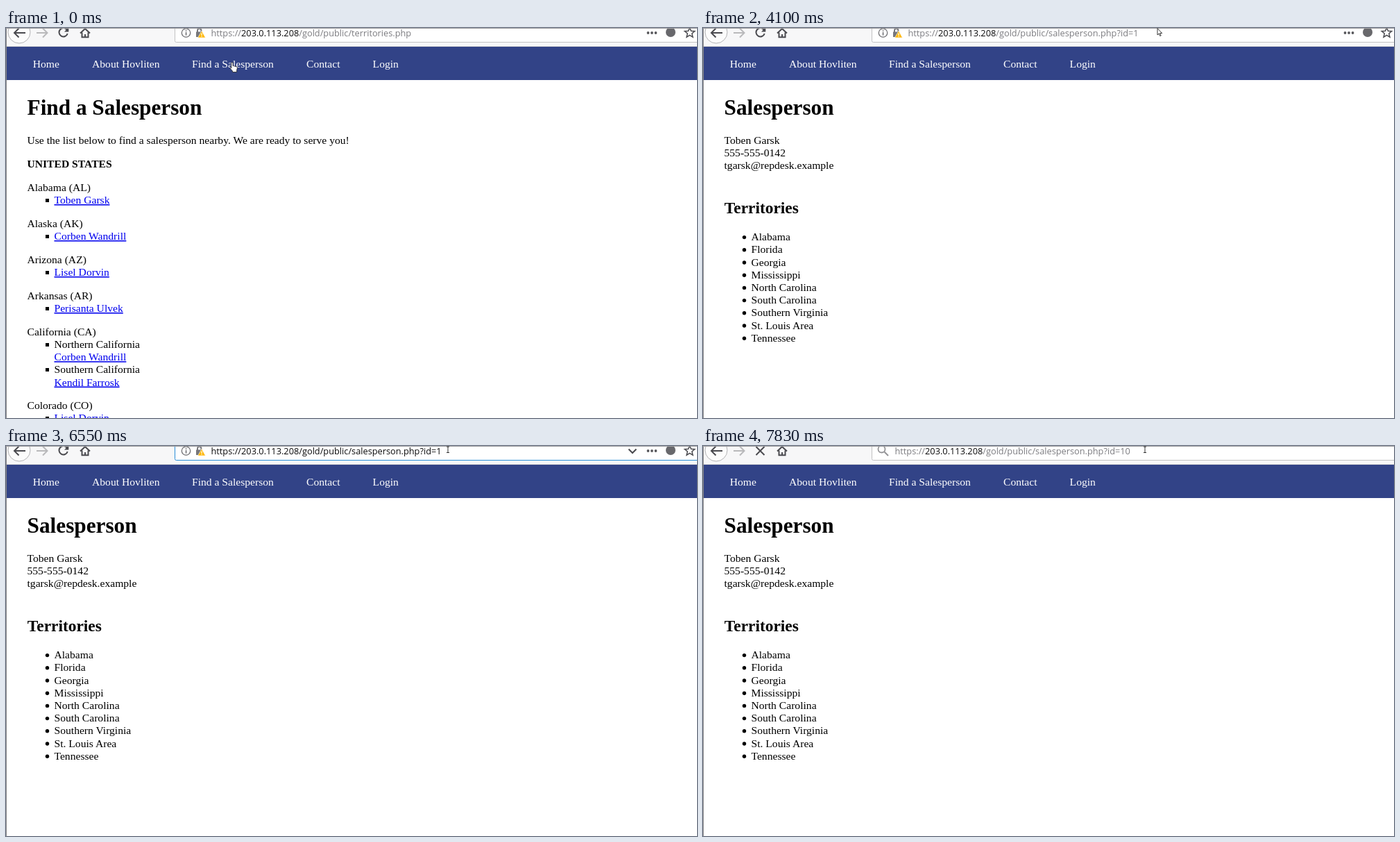
An HTML page that plays this animation: 996x562 px, repeating every 8000 ms.

```html
<!DOCTYPE html>
<html lang="en">
<head>
<meta charset="utf-8">
<title>Find a Salesperson</title>
<style>
  html, body { margin: 0; width: 100%; height: 100%; overflow: hidden; background: #fff; }
  svg { display: block; width: 996px; height: 562px; }
  text { white-space: pre; }
  #page { font: 15.62px "Liberation Serif", "Times New Roman", serif; }
  .h1 { font-size: 31.25px; font-weight: bold; }
  .h2 { font-size: 23.4px; font-weight: bold; }
  .b { font-weight: bold; }
  .link { fill: #00e; text-decoration: underline; }
  #bar, #drop { font: 12.77px "Open Sans", "Noto Sans", sans-serif; }
  .hit { font-size: 12.9px; font-weight: 600; }
  .visit { font-size: 11.6px; }
  .search { font-size: 11.08px; }
  .line { fill: none; stroke: #4a4a4f; stroke-width: 2; }
  .dim { fill: #7c7c80; }
  .host { fill: #0c0c0d; }
  .focus .dim { fill: #0c0c0d; }
  .picked .dim, .picked .host { fill: #fff; }
</style>
</head>
<body>
<svg id="stage" viewBox="0 0 996 562"></svg>
<script>
const LOOP = 8000;
const HOST = '203.0.113.208';
const PATH = '/gold/public/';

const text = (x, y, s, cls = '') => `<text x="${x}" y="${y}" class="${cls}">${s}</text>`;
const rect = (x, y, w, h, fill, more = '') =>
  `<rect x="${x}" y="${y}" width="${w}" height="${h}" fill="${fill}" ${more}/>`;
const circle = (x, y, r, fill, more = '') =>
  `<circle cx="${x}" cy="${y}" r="${r}" fill="${fill}" ${more}/>`;
const line = (d, style = '') => `<path class="line" d="${d}" style="${style}"/>`;
const shape = (d, fill, more = '') => `<path d="${d}" fill="${fill}" ${more}/>`;
const group = (id, ...parts) => `<g id="${id}">${parts.join('')}</g>`;

function nav() {
  const items = [[38.8, 'Home'], [124, 'About Hovliten'], [268, 'Find a Salesperson'],
                 [433, 'Contact'], [528.6, 'Login']];
  return rect(0, 27, 996, 48, '#324387') +
    `<g fill="#fff">${items.map(([x, s]) => text(x, 57, s)).join('')}</g>`;
}

function territories() {
  const reps = ['Toben Garsk', 'Corben Wandrill', 'Lisel Dorvin', 'Perisanta Ulvek', 'Kendil Farrosk'];
  const states = ['Alabama (AL)', 'Alaska (AK)', 'Arizona (AZ)', 'Arkansas (AR)'];
  const link = (y, i) => text(69.5, y, reps[i], 'link');
  const bullet = y => rect(57, Math.round(y - 7.2), 5, 5, '#000');
  let out = text(30.6, 125.4, 'Find a Salesperson', 'h1') +
    text(30.5, 167, 'Use the list below to find a salesperson nearby. We are ready to serve you!') +
    text(30.5, 201, 'UNITED STATES', 'b');
  states.forEach((s, i) => {
    const y = 234.8 + 52 * i;
    out += text(30.5, y, s) + bullet(y + 18.2) + link(y + 18.2, i);
  });
  out += text(30.5, 442.7, 'California (CA)');
  [['Northern', 1], ['Southern', 4]].forEach(([side, rep], i) => {
    const y = 461 + 36.4 * i;
    out += bullet(y) + text(69.5, y, side + ' California') + link(y + 18.2, rep);
  });
  return out + text(30.5, 549, 'Colorado (CO)') + bullet(567.2) + link(567.2, 2);
}

function profile() {
  const contact = ['Toben Garsk', '555-555-0142', 'tgarsk@repdesk.example'];
  const areas = ['Alabama', 'Florida', 'Georgia', 'Mississippi', 'North Carolina',
    'South Carolina', 'Southern Virginia', 'St. Louis Area', 'Tennessee'];
  return text(30.6, 125.4, 'Salesperson', 'h1') +
    contact.map((s, i) => text(30.5, 167 + 18.2 * i, s)).join('') +
    text(30.8, 266.5, 'Territories', 'h2') +
    areas.map((s, i) => circle(59.5, 301.6 + 18.2 * i, 2.7, '#000') +
      text(69.5, 306.2 + 18.2 * i, s)).join('');
}

function toolbar() {
  const star = [...Array(10)].map((_, i) => {
    const a = Math.PI * (i / 5 - .5), r = i % 2 ? 3.4 : 7.6;
    return `${985.5 + r * Math.cos(a)} ${7 + r * Math.sin(a)}`;
  }).join('L');
  return rect(0, 0, 996, 27, '#f7f7f8') + rect(0, 26, 996, 1, '#d2d2d4') +
    circle(19, 6, 16, '#fcfcfc', 'stroke="#b4b4b6"') +
    line('M28 7H12M18.5 .5 12 7l6.5 6.5') +
    line('M44 7H59M53 .5 59.5 7 53 13.5', 'stroke:#b9b9bb') +
    group('reload', line('M88 3A6.2 6.2 0 1 0 88.7 8'), shape('M90.3-1V5.5H84z', '#4a4a4f')) +
    group('stop', line('M76.5 1 88.5 13M88.5 1 76.5 13')) +
    line('M107 7.5 114 1l7 6.5M109.5 6.5V13.3H118.5V6.5M114 13V9') +
    rect(243.5, -10, 800, 30.5, '#fff', 'id="field" rx="2"') +
    group('siteInfo',
      circle(259.5, 7, 6.2, 'none', 'stroke="#68686c" stroke-width="1.2"'),
      rect(258.8, 6, 1.5, 4.6, '#68686c'), rect(258.8, 3.3, 1.5, 1.6, '#68686c'),
      line('M276 6V3.5a2.7 2.7 0 0 1 5.4 0V6', 'stroke:#77777b'),
      rect(274, 5.5, 9, 7.5, '#77777b'),
      shape('M282 4.2 287.5 14H276.5z', '#ffb80a', 'stroke="#fff" stroke-width=".6"'),
      rect(281.4, 7.5, 1.3, 3, '#fff'), rect(281.4, 11.4, 1.3, 1.2, '#fff')) +
    group('lens', line('M261.5 8.5 267 14', 'stroke:#939396'),
      circle(257.5, 4.5, 5, 'none', 'stroke="#939396" stroke-width="1.8"')) +
    group('actions',
      ...[925.5, 931, 936.5].map(x => circle(x, 7, 1.9, '#58585c')),
      circle(958, 6, 7, '#68686c'),
      line(`M${star}z`, 'stroke-width:1.5')) +
    group('chevron', line('M897.5 4.5 903 10l5.5-5.5')) +
    group('go', line('M978 7H992M986 .5 992.5 7 986 13.5')) +
    group('mark', rect(296, 1, 331, 16, '#0078d7')) +
    `<text id="url" y="11.5"><tspan class="dim">https://</tspan>` +
    `<tspan class="host">${HOST}</tspan><tspan id="path" class="dim"></tspan></text>` +
    rect(0, 1, 1, 13.5, '#000', 'id="caret"');
}

function dropdown() {
  const url = `https://${HOST}${PATH}salesperson.php?id=10`;
  const colors = ['#4285f4', '#0c8484', '#222', '#de5833', '#e53238', '#1da1f2', '#222'];
  const icons = colors.map((c, i) => {
    const x = 24 + 47.8 * i;
    return (i ? rect(Math.round(x - 24.5), 95, 1, 23, '#d4d4d6') : '') +
      (i === 1 ? rect(x - 8, 98, 16, 16, c) : circle(x, 106, i === 3 ? 8 : 6, c));
  });
  return rect(0, 26, 996, 96, '#f9f9fa') + rect(0, 26, 996, 1, '#d2d2d4') +
    rect(3, 30.5, 993, 30, '#0078d7') +
    `<g fill="none" stroke="#fff" stroke-width="1.3">
      <circle cx="260.5" cy="46" r="7"/><ellipse cx="260.5" cy="46" rx="3.2" ry="7"/>
      <path d="M254 43.5h13M254 48.5h13"/></g>` +
    `<g fill="#fff">${text(277, 51, url, 'hit')}${text(633.5, 50.5, '— Visit', 'visit')}</g>` +
    rect(0, 64, 996, 1, '#d8d8da') + rect(0, 90, 996, 1, '#d8d8da') +
    text(6, 81.8, `<tspan class="dim">Search for </tspan>${url}<tspan class="dim"> with:</tspan>`, 'search') +
    icons.join('') + rect(3, 122, 993, 1.5, '#a2a2a4');
}

const cursors = group('cursor',
  group('hand', shape('M-1 1.2a1.1 1.1 0 0 1 2.2 0V5l5 1.2q1.4.4 1.2 2l-.8 3.4V14H.5v-1.4L-3 8.6q-.4-1.4 1-1.3l1 1z',
    '#fff', 'stroke="#222" stroke-width=".8"')),
  group('arrow', shape('M0 0V9.5L2.2 7.5 3.7 11 5.2 10.3 3.7 7H6.7z', '#fff', 'stroke="#222" stroke-width=".9"')),
  group('beam', line('M-2 0H2M0 0V8.5M-2 8.5H2', 'stroke:#333;stroke-width:1')));

const $ = id => document.getElementById(id);
$('stage').innerHTML =
  group('page', nav(), group('list', territories()), group('person', profile())) +
  group('bar', toolbar()) + group('drop', dropdown()) +
  rect(0, 0, 1, 562, '#858587') + rect(0, 0, 996, 1, '#a0a0a2') + cursors;

const show = (id, on) => { $(id).style.display = on ? '' : 'none'; };
const ramp = (t, a, b) => Math.min(1, Math.max(0, (t - a) / (b - a)));
const ease = p => p * p * (3 - 2 * p);
const within = (t, a, b) => t >= a && t < b;

// time, x, y of the pointer tip
const moves = [[0, 326, 49.5], [1200, 326, 49.5], [1240, 318, 53.5], [1390, 318, 53.5],
  [1870, 117, 255], [2180, 117, 255], [2330, 129, 247.5], [3180, 129, 247.5],
  [3730, 600, 8], [3850, 648, 3], [4000, 655, .5], [4230, 655, .5], [4300, 637, 1], [LOOP, 637, 1]];

function pointer(t) {
  const i = moves.findIndex(m => m[0] > t);
  const [a, b] = [moves[i - 1], moves[i]];
  const p = ease(ramp(t, a[0], b[0]));
  return [a[1] + (b[1] - a[1]) * p, a[2] + (b[2] - a[2]) * p];
}

function draw(t) {
  const opened = t >= 3320, typed = t >= 7010;
  const focus = within(t, 4500, 7440), picked = within(t, 4560, 5290);
  show('list', !opened);
  show('person', opened);
  show('drop', within(t, 7010, 7440));

  const busy = ramp(t, 280, 560) - ramp(t, 820, 960) + ramp(t, 2730, 2980) -
    ramp(t, 3450, 3730) + ramp(t, 7440, 7780);
  $('reload').setAttribute('transform', `rotate(${180 * busy} 82.5 6.5)`);
  $('reload').style.opacity = 1 - busy;
  $('stop').setAttribute('transform', `translate(82.5 7) scale(${busy}) translate(-82.5 -7)`);

  $('bar').setAttribute('class', (focus ? 'focus ' : '') + (picked ? 'picked' : ''));
  $('field').setAttribute('stroke', focus ? '#2a8fd8' : '#c2c2c4');
  show('siteInfo', !typed);
  show('actions', !typed);
  show('lens', typed);
  show('chevron', focus && !typed);
  show('go', focus && typed);
  show('mark', picked);
  $('path').textContent = PATH +
    (t < 2730 ? 'territories.php' : 'salesperson.php?id=' + (typed ? '10' : '1'));
  const x = typed ? 276.5 : 295.5;
  $('url').setAttribute('x', x);
  $('caret').setAttribute('x', Math.round(x + $('url').getComputedTextLength()));
  show('caret', within(t, 5290, 5720) || within(t, 6150, 6550) || within(t, 7010, 7440));

  const [px, py] = pointer(t);
  $('cursor').setAttribute('transform', `translate(${px} ${py})`);
  const hand = t < 1390 || within(t, 1800, 3250), beam = t >= 4240;
  show('hand', hand);
  show('beam', beam);
  show('arrow', !hand && !beam);
}

const start = performance.now();
function tick() {
  draw((performance.now() - start) % LOOP);
  requestAnimationFrame(tick);
}
tick();
</script>
</body>
</html>
```
